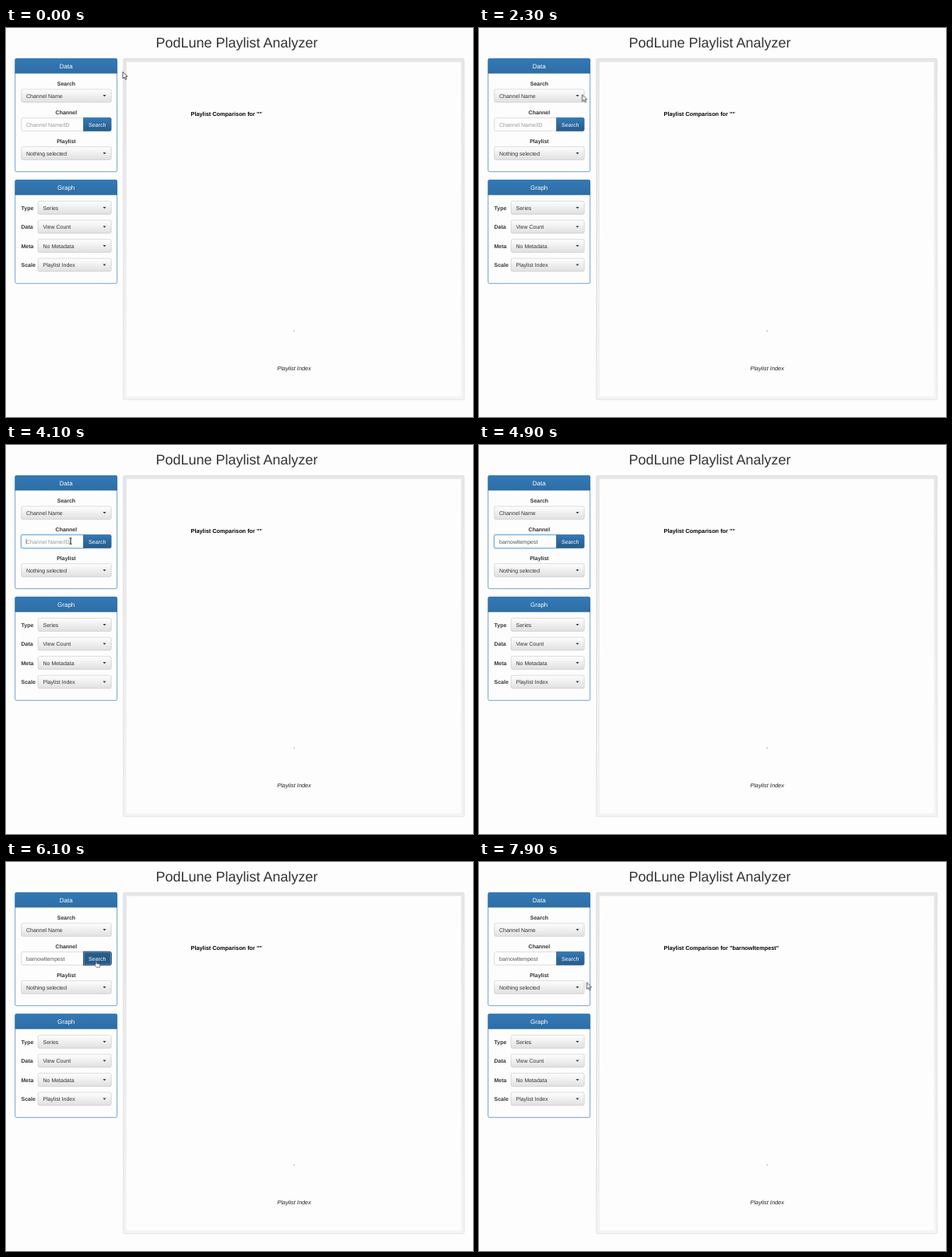
These frames come from a looping animation (600 px wide and 500 px high, 8000 ms). An HTML page:

```html
<!DOCTYPE html>
<html lang="en">
<head>
<meta charset="utf-8">
<title>Playlist Analyzer</title>
<style>
html, body { margin: 0; width: 100%; height: 100%; overflow: hidden; background: #fefdfe; }
svg { display: block; width: 600px; height: 500px; }
text { font: 7px "Liberation Sans", Arial, sans-serif; fill: #333; text-rendering: geometricPrecision; white-space: pre; }
.title { font-size: 18px; }
.head { font-size: 8px; fill: #fff; }
.mid { text-anchor: middle; }
.bold { font-weight: bold; }
.chart { font-size: 7.35px; font-weight: bold; fill: #000; }
.axis { font-size: 7.35px; font-style: italic; fill: #222; }
.panel { fill: #fefdfe; stroke: #337ab7; stroke-width: .7; }
.bar { fill: url(#blue); }
.drop { fill: url(#grey); stroke: #c4c4c4; stroke-width: .6; }
.field { fill: #fefdfe; stroke: #c4c4c4; stroke-width: .6; }

/* One loop is 8 s, so 1.25% is 100 ms */
.anim, .anim * { animation: 8s step-end infinite; }
#pointer { animation-name: move; }
#arrow { animation-name: arrow; }
#hand { animation-name: hand; }
#beam { animation-name: beam; }
#hover { animation-name: hover; }
#ring { animation-name: ring; }
#focus { animation-name: focus; }
#caret { animation-name: caret; }
#hint { animation-name: hint; }
#before { animation-name: before; }
#after { animation-name: after; }
#typed { fill: #555; animation: none; }
#k1 { animation-name: key1; }
#k2 { animation-name: key2; }
#k3 { animation-name: key3; }
#k4 { animation-name: key4; }

@keyframes move {
  0% { transform: translate(150px, 56px); }
  25% { transform: translate(150px, 56px); animation-timing-function: steps(9, start); }
  36.24% { transform: translate(111px, 122px); }
  36.25% { transform: translate(122px, 122px); }
  40% { transform: translate(124px, 118px); }
  41.25% { transform: translate(124px, 118px); animation-timing-function: steps(8, start); }
  51.25% { transform: translate(83px, 123.5px); }
  67.5% { transform: translate(95px, 124px); }
  68.75% { transform: translate(101px, 124px); }
  70% { transform: translate(106.5px, 123.5px); }
  71.25% { transform: translate(107px, 124px); }
  75% { transform: translate(107px, 124px); animation-timing-function: steps(8, start); }
  85% { transform: translate(143px, 135px); }
  93.75% { transform: translate(143px, 135px); animation-timing-function: steps(5, start); }
  100% { transform: translate(138.5px, 154.5px); }
}
@keyframes arrow { 0%, 82.5%, 100% { visibility: visible; } 35% { visibility: hidden; } }
@keyframes hand { 0%, 46.25%, 82.5%, 100% { visibility: hidden; } 35%, 68.75% { visibility: visible; } }
@keyframes beam { 0%, 57.5%, 68.75%, 100% { visibility: hidden; } 46.25%, 67.5% { visibility: visible; } }
@keyframes hover { 0%, 46.25%, 82.5%, 100% { opacity: 0; } 33.75% { opacity: .5; } 35%, 68.75% { opacity: 1; } }
@keyframes ring { 0%, 91.25%, 100% { opacity: 0; } 73.75% { opacity: 1; } 90% { opacity: .5; } }
@keyframes focus { 0%, 75%, 100% { opacity: 0; } 47.5%, 73.75% { opacity: .5; } 48.75% { opacity: 1; } }
@keyframes caret { 0%, 57.5%, 100% { visibility: hidden; } 48.75% { visibility: visible; } }
@keyframes hint { 0% { visibility: visible; } 57.5%, 100% { visibility: hidden; } }
@keyframes before { 0% { visibility: visible; } 77.5%, 100% { visibility: hidden; } }
@keyframes after { 0% { visibility: hidden; } 77.5%, 100% { visibility: visible; } }
@keyframes key1 { 0% { visibility: hidden; } 57.5%, 100% { visibility: visible; } }
@keyframes key2 { 0% { visibility: hidden; } 58.75%, 100% { visibility: visible; } }
@keyframes key3 { 0% { visibility: hidden; } 60%, 100% { visibility: visible; } }
@keyframes key4 { 0% { visibility: hidden; } 61.25%, 100% { visibility: visible; } }
</style>
</head>
<body>
<svg viewBox="0 0 600 500">
  <defs>
    <linearGradient id="blue" x2="0" y2="1"><stop stop-color="#337ab7"/><stop offset="1" stop-color="#2e6da4"/></linearGradient>
    <linearGradient id="button" x2="0" y2="1"><stop stop-color="#337ab7"/><stop offset="1" stop-color="#265a88"/></linearGradient>
    <linearGradient id="pressed" x2="0" y2="1"><stop stop-color="#2d6a9f"/><stop offset=".5" stop-color="#265a88"/></linearGradient>
    <linearGradient id="grey" x2="0" y2="1"><stop stop-color="#fefefe"/><stop offset="1" stop-color="#e0e0e0"/></linearGradient>
    <linearGradient id="well" x2="0" y2="1"><stop stop-color="#e6e6e8"/><stop offset="1" stop-color="#f4f4f5"/></linearGradient>
    <path id="tri" d="M124.5 -1h4l-2 2.2z" fill="#333"/>
  </defs>

  <rect width="600" height="500" fill="#fefdfe"/>
  <text class="title mid" x="296.5" y="25">PodLune Playlist Analyzer</text>

  <!-- Data panel -->
  <rect class="panel" x="11.7" y="39.3" width="131" height="145.4" rx="2"/>
  <path class="bar" d="M11.5 58.5V41a2 2 0 0 1 2-2h127.5a2 2 0 0 1 2 2v17.5z"/>
  <text class="head mid" x="77.2" y="51.5">Data</text>
  <text class="bold mid" x="77.4" y="73.5">Search</text>
  <rect class="drop" x="19.7" y="78.8" width="115.5" height="16.8" rx="2"/>
  <text x="26" y="89.5">Channel Name</text>
  <use href="#tri" y="87"/>

  <text class="bold mid" x="77.4" y="110.5">Channel</text>
  <path class="field" d="M99.5 115.6H21.7a2 2 0 0 0 -2 2v12.8a2 2 0 0 0 2 2H99.5z"/>
  <g class="anim">
    <g id="focus" fill="none">
      <rect x="18.7" y="114.6" width="82" height="18.8" rx="3" stroke="#66afe9" stroke-opacity=".3" stroke-width="1.6"/>
      <rect x="19.7" y="115.6" width="80" height="16.8" rx="2" stroke="#66afe9" stroke-width=".9"/>
    </g>
    <text id="hint" x="26" y="126.5" style="fill:#999">Channel Name/ID</text>
    <path id="caret" d="M26 120.5v7" stroke="#333" stroke-width=".6"/>
    <text id="typed" x="26" y="126.5"><tspan id="k1">barn</tspan><tspan id="k2">owl</tspan><tspan id="k3">temp</tspan><tspan id="k4">est</tspan></text>
  </g>
  <path id="go" d="M99.5 115.3h33.7a2 2 0 0 1 2 2v13.3a2 2 0 0 1 -2 2H99.5z" fill="url(#button)" stroke="#245580" stroke-width=".5"/>
  <g class="anim">
    <g id="hover"><use href="#go" style="animation:none"/><path d="M99.5 115.3h33.7a2 2 0 0 1 2 2v13.3a2 2 0 0 1 -2 2H99.5z" fill="url(#pressed)" stroke="#1f4a70" stroke-width=".5"/></g>
    <g id="ring">
      <path d="M99.5 115.3h33.7a2 2 0 0 1 2 2v13.3a2 2 0 0 1 -2 2H99.5z" fill="#265a88" stroke="#204d74" stroke-width=".5"/>
      <rect x="100.2" y="116" width="34.2" height="15.9" fill="none" stroke="#7d9db8" stroke-width=".7"/>
    </g>
  </g>
  <text class="mid" x="117.2" y="126.5" style="fill:#fff">Search</text>

  <text class="bold mid" x="77.4" y="147.5">Playlist</text>
  <rect class="drop" x="19.7" y="152.6" width="115.5" height="16.8" rx="2"/>
  <text x="26" y="163.5">Nothing selected</text>
  <use href="#tri" y="161"/>

  <!-- Graph panel -->
  <rect class="panel" x="11.7" y="195.3" width="131" height="133" rx="2"/>
  <path class="bar" d="M11.5 214.7V197a2 2 0 0 1 2-2h127.5a2 2 0 0 1 2 2v17.7z"/>
  <text class="head mid" x="77.2" y="207.8">Graph</text>
  <text class="bold" x="19.5" y="233.5">Type</text>
  <rect class="drop" x="41.2" y="222.6" width="94" height="16.8" rx="2"/>
  <text x="47.5" y="233.5">Series</text>
  <use href="#tri" y="231"/>
  <text class="bold" x="19.5" y="258">Data</text>
  <rect class="drop" x="41.2" y="247.1" width="94" height="16.8" rx="2"/>
  <text x="47.5" y="258">View Count</text>
  <use href="#tri" y="255.5"/>
  <text class="bold" x="19.5" y="282.5">Meta</text>
  <rect class="drop" x="41.2" y="271.6" width="94" height="16.8" rx="2"/>
  <text x="47.5" y="282.5">No Metadata</text>
  <use href="#tri" y="280"/>
  <text class="bold" x="19.5" y="307">Scale</text>
  <rect class="drop" x="41.2" y="296.1" width="94" height="16.8" rx="2"/>
  <text x="47.5" y="307">Playlist Index</text>
  <use href="#tri" y="304.5"/>

  <!-- Chart area -->
  <rect x="150.7" y="39.3" width="438" height="438.4" rx="1.5" fill="url(#well)" stroke="#d6d6d8" stroke-width=".6"/>
  <rect x="155" y="43.7" width="429.6" height="429.6" fill="#fefdfe"/>
  <g class="anim">
    <text id="before" class="chart" x="237.5" y="113">Playlist Comparison for ""</text>
    <text id="after" class="chart" x="237.5" y="113">Playlist Comparison for "barnowltempest"</text>
  </g>
  <path d="M370.2 388v2.5" stroke="#888" stroke-width=".6"/>
  <text class="axis mid" x="370.2" y="439.8">Playlist Index</text>

  <!-- Mouse pointer -->
  <g class="anim">
    <g id="pointer">
      <path id="arrow" d="M0 .5V9l2-1.8 1.5 3 1.4-.7-1.4-2.8 2.6-.3z" fill="#fff" stroke="#222" stroke-width=".8"/>
      <path id="hand" d="M-.8 1.2q.7-1 1.5 0v2.5l3.6.8q.9.3.7 1.4l-.6 2.6H.2L-2.2 5.4q0-1 1.4-.3z" fill="#fff" stroke="#222" stroke-width=".6"/>
      <path id="beam" d="M-1.7-3.7h1.2l.5.5.5-.5h1.2M-1.7 3.7h1.2l.5-.5.5.5h1.2M0-3.2v6.4" fill="none" stroke="#222" stroke-width="1.1"/>
    </g>
  </g>
</svg>
</body>
</html>
```
